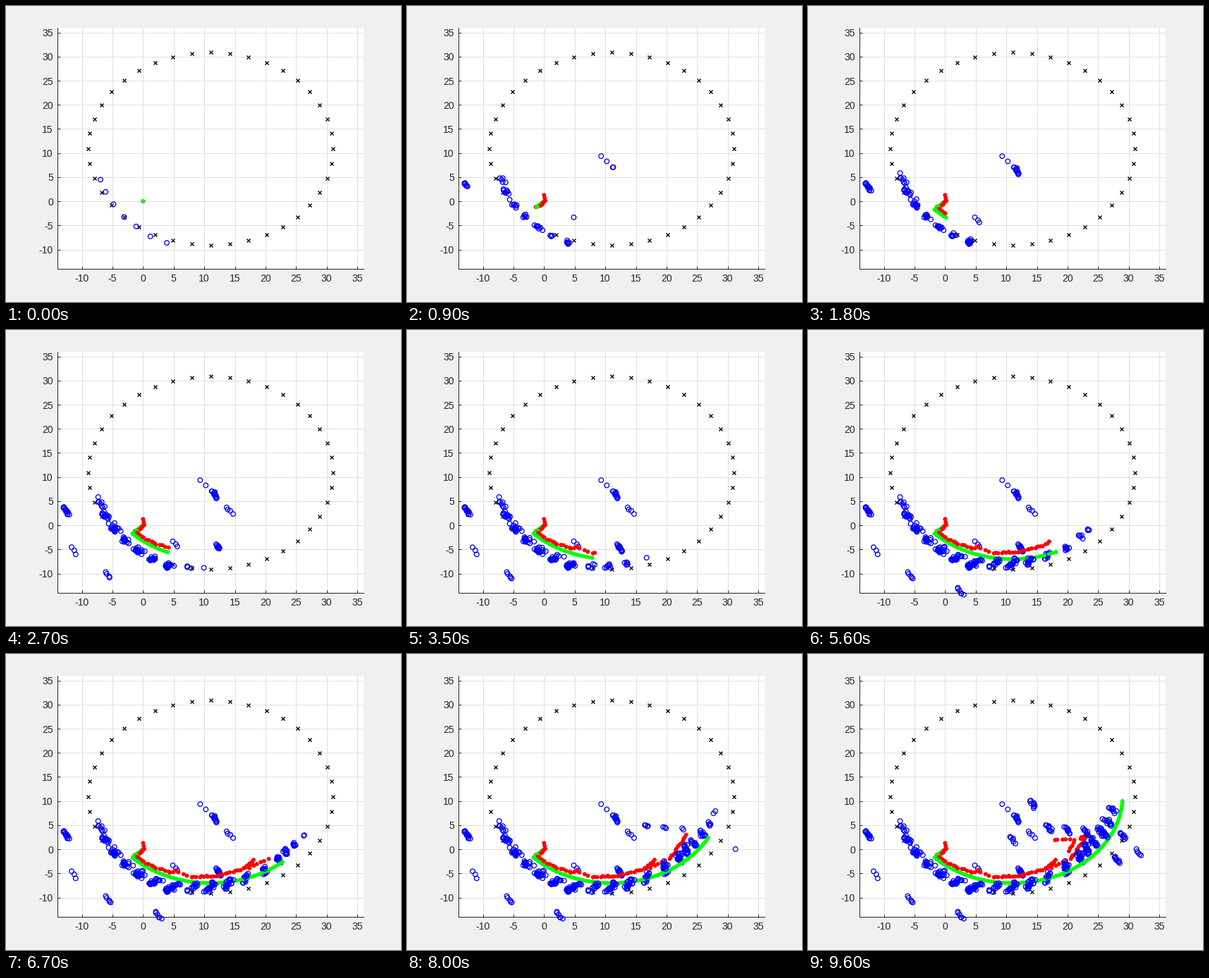
A matplotlib script that plays this animation: 560x420 px, repeating every 9700 ms.

```python
import numpy as np
import matplotlib.pyplot as plt
from matplotlib.animation import FuncAnimation

FRAMES, STEP_MS = 97, 100
W, H, DPI = 560, 420, 80
PX = 72 / DPI  # points per pixel
INK = "#262626"

CENTER = 11          # x and y of the landmark ring
RING, TRACK = 20, 18  # radii of the ring and of the true path
TURN = 1.587         # degrees per frame along the track
AHEAD, BEHIND = 28.5, 30  # field of view in degrees
HIT_RATE = .55

# Where the estimate bends or jumps: frame, x, y
GUESS_KEYS = np.array([
    (0, 0, 0), (1, 0, 1.3), (3, .2, .1), (10, -1.3, -1.4), (18, .1, -2.7),
    (28, 4.4, -4.9), (30, 5.3, -4.4), (34, 8, -5.8), (44, 12, -5.5),
    (54, 16.5, -4.1), (59, 17.9, -2.2), (62, 17.4, -3.7), (67, 20.5, -2),
    (80, 23.3, 3), (86, 22.1, 2.1), (87, 20.2, -.5), (91, 21.1, 2),
    (96, 17.9, 2),
])

# False sightings: first frame, count, x, y
STRAYS = [
    (3, 14, -12.6, 3), (21, 3, -11.4, -5.3), (24, 5, -5.7, -10.4),
    (48, 6, 2.5, -13.7), (4, 2, 9.7, 8.8), (8, 11, 11.7, 6.4),
    (24, 4, 14.1, 3.2), (20, 12, 12.4, -4.7), (9, 3, 5.1, -3.8),
    (82, 9, 14.3, 9.4), (83, 6, 11, 2), (82, 9, 28.1, -2.2),
    (80, 5, 31.6, -.6),
]
# A row of them appears near the end
STRAYS += [(77 + i, 9, 17 + 3 * i, 4.4 - .4 * i) for i in range(5)]

plt.rcParams.update({
    "font.family": "Liberation Sans",
    "font.size": 14 * PX,
    "axes.unicode_minus": False,
})
rng = np.random.default_rng(7)


def polar(radius, degrees):
    a = np.radians(degrees)
    return np.stack([CENTER + radius * np.cos(a),
                     CENTER + radius * np.sin(a)], axis=-1)


def heading(frame):
    """Angle of the vehicle around the ring."""
    return np.maximum(225, 356.8 - TURN * (FRAMES - 1 - frame))


def true_path(frame):
    start = CENTER * np.sqrt(2)
    radius = np.minimum(TRACK, start + .19 * frame)
    return polar(radius, heading(frame))


def guess_path(frame):
    t, x, y = GUESS_KEYS.T
    path = np.column_stack([np.interp(frame, t, x), np.interp(frame, t, y)])
    wobble = np.where(frame[:, None] > 3, .1, 0)
    return path + wobble * rng.normal(size=path.shape)


def sight(frame, angle):
    """Measured place of a landmark; the error grows along the way."""
    seen = heading(frame) - (angle - AHEAD)
    age = 2 * seen / (AHEAD + BEHIND) - 1
    drift = np.interp(angle, [250, 315], [0, 3.7])
    slip = 5 * np.exp(-((angle - 306) / 14) ** 2)
    blur = np.interp(angle, [207, 252], [3, .7]) * min(1, (frame + 1) / 8)
    return polar(RING - drift - age + rng.normal(0, .2),
                 angle + slip + 2 * age + rng.normal(0, blur))


def sightings():
    pos, born = [], []
    for frame in range(FRAMES):
        for angle in range(198, 360, 9):
            ahead = angle - heading(frame)
            if -BEHIND <= ahead <= AHEAD and (
                    frame == 0 or rng.random() < HIT_RATE):
                pos.append(sight(frame, angle))
                born.append(frame)
    for first, n, x, y in STRAYS:
        for i, u in enumerate(np.linspace(-1, 1, n)):
            pos.append((x, y) + u * np.array([.4, -.7]) + rng.normal(0, .1, 2))
            born.append(first + i)
    return np.array(pos), np.array(born)


steps = np.arange(FRAMES)
seen, seen_t = sightings()

# All marks in the order in which they are laid down
pos = np.vstack([seen, guess_path(steps), true_path(steps)])
born = np.concatenate([seen_t, steps, steps])
kind = np.repeat([0, 1, 2], [len(seen), FRAMES, FRAMES])
order = np.lexsort((kind, born))
pos, born, kind = pos[order], born[order], kind[order]

FACE = np.array([(0, 0, 1, 0), (1, 0, 0, 1), (0, 1, 0, 1)])
EDGE = np.array([(0, 0, 1, 1), (1, 0, 0, 0), (0, 1, 0, 0)])
SIZE = (np.array([6.6, 5.9, 5.9]) * PX) ** 2

fig = plt.figure(figsize=(W / DPI, H / DPI), dpi=DPI, facecolor="#f0f0f0")
ax = fig.add_axes([72.8 / W, 47 / H, 434 / W, 342.3 / H])
ax.set(xlim=(-14, 36), ylim=(-14, 36),
       xticks=range(-10, 36, 5), yticks=range(-10, 36, 5))
ax.set_axisbelow(True)
ax.grid(color="#dfdfdf", lw=PX)
ax.tick_params(direction="in", length=4.3 * PX, width=PX,
               color=INK, labelcolor=INK)
ax.tick_params(axis="x", pad=7 * PX)
ax.tick_params(axis="y", pad=6 * PX)
ax.spines[["top", "right"]].set_visible(False)
for side in ("left", "bottom"):
    ax.spines[side].set(color=INK, linewidth=PX)

ax.plot(*polar(RING, np.arange(0, 360, 9)).T, "kx",
        ms=5 * PX, mew=1.4 * PX, zorder=2.5)
marks = ax.scatter(*pos.T, s=SIZE[kind], facecolors=FACE[kind],
                   edgecolors=EDGE[kind], linewidths=1.3 * PX,
                   clip_on=False, zorder=3)


def update(frame):
    shown = born[:, None] <= frame
    marks.set_offsets(np.where(shown, pos, np.nan))
    return [marks]


anim = FuncAnimation(fig, update, frames=FRAMES, interval=STEP_MS,
                     repeat=True, repeat_delay=0)
plt.show()
```
